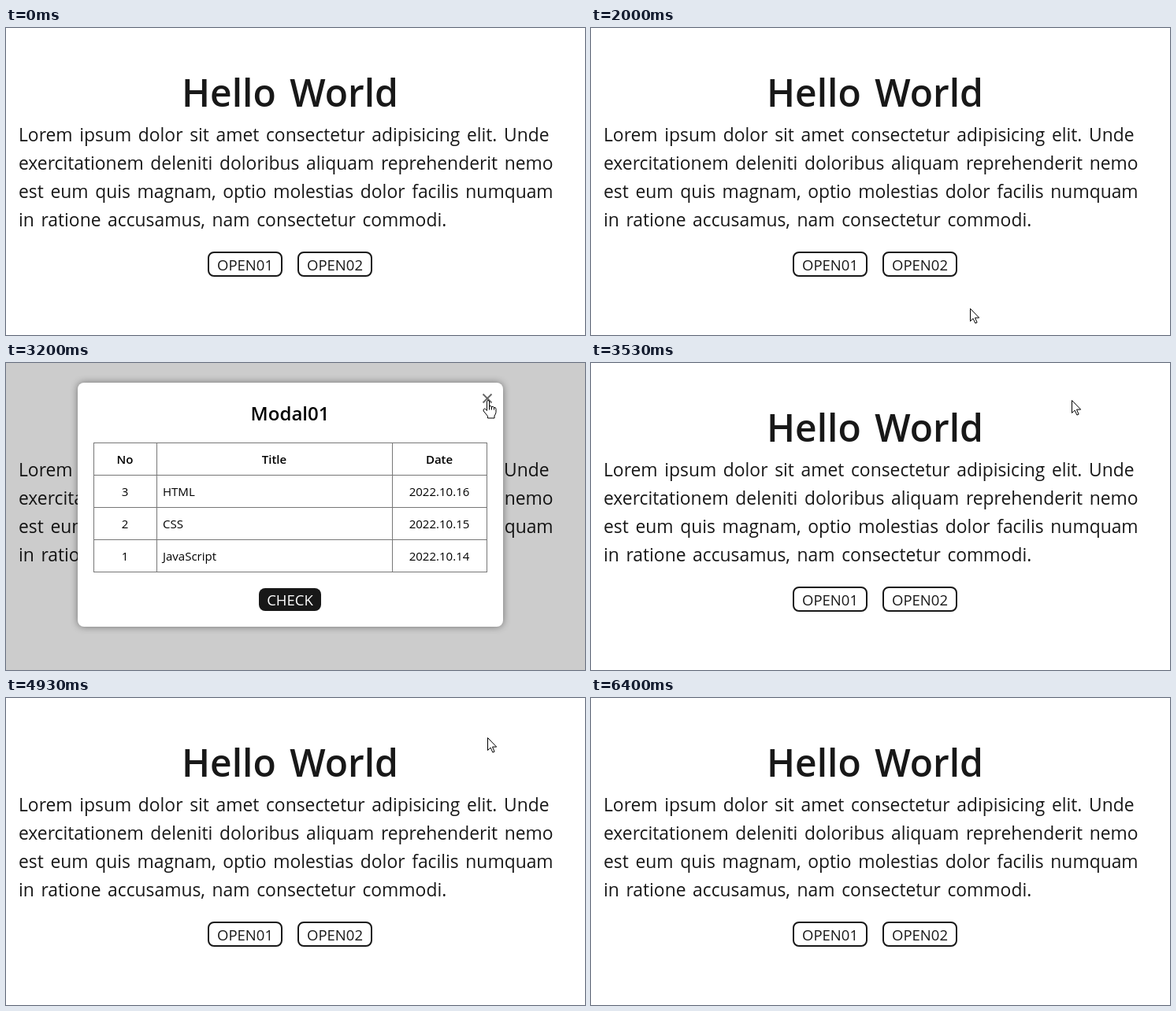
Recreate the animation shown at these times as an HTML page with a canvas. Size 735x390 px, loop 6790 ms.

```html
<!DOCTYPE html>
<html lang="en">
<head>
<meta charset="utf-8">
<title>Modal demo</title>
<style>
  html, body { margin: 0; width: 100%; height: 100%; overflow: hidden; background: #fff; }
  canvas { display: block; }
</style>
</head>
<body>
<canvas id="stage" width="735" height="390"></canvas>
<script>
const ctx = document.getElementById('stage').getContext('2d');
const LOOP = 6790;
const STEP = 200 / 3;          // the screen refreshes 15 times a second
const INK = '#181818';
const FAMILY = '"Open Sans", "Noto Sans", sans-serif';

const PARAGRAPH = [
  'Lorem ipsum dolor sit amet consectetur adipisicing elit. Unde',
  'exercitationem deleniti doloribus aliquam reprehenderit nemo',
  'est eum quis magnam, optio molestias dolor facilis numquam',
  'in ratione accusamus, nam consectetur commodi.'
];
const ROWS = [
  ['No', 'Title', 'Date'],
  ['3', 'HTML', '2022.10.16'],
  ['2', 'CSS', '2022.10.15'],
  ['1', 'JavaScript', '2022.10.14']
];

// All times below are in steps.
const MODALS = [
  [15, 30, 'Modal01'], [37, 53, 'Modal01'],
  [63, 74, 'Modal02'], [84, 94, 'Modal02']
];
const HANDS = [[12, 16], [35, 37], [48, 53], [61, 64], [71, 74], [82, 84]];

const easeInOut = p => p * p * (3 - 2 * p);
const easeOut = p => 1 - (1 - p) * (1 - p);
const linear = p => p;

// step, x, y, easing used to arrive there
const PATH = [
  [6, 356, 367],
  [12, 321, 308, easeOut],
  [15, 321, 308],
  [25, 531, 351, easeInOut],
  [27, 545, 367],
  [29, 545, 367],
  [30, 481, 356],
  [35, 315, 306, easeOut],
  [37, 315, 306],
  [47, 610, 47, easeInOut],
  [53, 610, 47],
  [61, 421, 289, easeInOut],
  [63, 421, 289],
  [70, 613, 45, easeInOut],
  [71, 611, 50],
  [74, 611, 50],
  [82, 414, 300, easeInOut],
  [84, 414, 300],
  [90, 671, 350, easeInOut],
  [93, 671, 350],
  [94, 684, 353],
  [96, 735, 360]
];

const during = (n, [from, to]) => n >= from && n < to;

function cursorAt(n) {
  const i = PATH.findIndex(key => key[0] > n);
  if (i < 1) return null;
  const [t0, x0, y0] = PATH[i - 1];
  const [t1, x1, y1, ease = linear] = PATH[i];
  const p = ease((n - t0) / (t1 - t0));
  return [Math.round(x0 + (x1 - x0) * p), Math.round(y0 + (y1 - y0) * p)];
}

function text(str, x, y, size, { weight = 400, color = INK, align = 'left', gap = 0 } = {}) {
  ctx.font = `${weight} ${size}px ${FAMILY}`;
  ctx.wordSpacing = `${gap}px`;
  ctx.fillStyle = color;
  ctx.textAlign = align;
  ctx.fillText(str, x, y);
}

function roundRect(x, y, w, h, r) {
  ctx.beginPath();
  ctx.roundRect(x, y, w, h, r);
}

function line(x0, y0, x1, y1) {
  ctx.beginPath();
  ctx.moveTo(x0, y0);
  ctx.lineTo(x1, y1);
  ctx.stroke();
}

function openButton(label, x) {
  ctx.strokeStyle = INK;
  ctx.lineWidth = 2;
  roundRect(x + 1, 285, 93, 30, 7);
  ctx.stroke();
  text(label, x + 47.5, 308, 18.5, { align: 'center' });
}

function drawPage() {
  ctx.fillStyle = '#fff';
  ctx.fillRect(0, 0, 735, 390);
  text('Hello World', 360.5, 100, 48, { weight: 600, align: 'center', gap: 5 });
  PARAGRAPH.forEach((row, i) => text(row, 16, 144 + i * 36, 22.85, { gap: 2.7 }));
  openButton('OPEN01', 256);
  openButton('OPEN02', 370);
}

function drawTable() {
  ctx.strokeStyle = '#777';
  ctx.lineWidth = 1;
  for (let i = 0; i < 5; i++) line(111, 101.5 + i * 41, 611, 101.5 + i * 41);
  for (const x of [111.5, 191.5, 490.5, 610.5]) line(x, 101, x, 266);

  ROWS.forEach(([no, title, date], i) => {
    const y = 128 + i * 41;
    const center = { weight: i ? 400 : 600, color: '#000', align: 'center' };
    text(no, 151, y, 15, center);
    text(date, 550, y, 15, center);
    if (i) text(title, 199, y, 15, { color: '#000' });
    else text(title, 340.5, y, 15, center);
  });
}

function drawModal(title) {
  ctx.fillStyle = 'rgba(0, 0, 0, .2)';
  ctx.fillRect(0, 0, 735, 390);

  ctx.save();
  ctx.shadowColor = 'rgba(0, 0, 0, .45)';
  ctx.shadowBlur = 10;
  ctx.fillStyle = '#fff';
  roundRect(91, 25, 540, 310, 8);
  ctx.fill();
  ctx.restore();

  ctx.strokeStyle = '#666';
  ctx.lineWidth = 1.8;
  line(605.5, 39.5, 616.5, 50.5);
  line(616.5, 39.5, 605.5, 50.5);

  text(title, 360.5, 73, 24, { weight: 600, color: '#000', align: 'center' });
  drawTable();

  ctx.fillStyle = INK;
  roundRect(321, 286, 79, 29, 8);
  ctx.fill();
  text('CHECK', 360.5, 308, 18.5, { weight: 500, color: '#fff', align: 'center' });
}

const ARROW = new Path2D('M0 0V16L3.6 12.6L6.4 18.6L8.6 17.6L6 11.6H11.2Z');
const HAND = new Path2D(
  'M0 13V1.5Q0 0 1.5 0T3 1.5V7.5Q4.5 6.3 6 8Q7.6 7 9 9Q11.5 8.6 11.5 11V15' +
  'Q11.3 17.5 9.5 19.5V22.5H1V20L-4.3 13.5Q-5 11 -3 10.5Q-1.6 10.8 0 13Z' +
  'M3 7.5V12M6 8V12M9 9V12');

function drawCursor([x, y], shape) {
  ctx.save();
  ctx.translate(x + .5, y + .5);
  ctx.lineWidth = 1;
  ctx.lineJoin = 'round';
  ctx.fillStyle = '#fff';
  ctx.strokeStyle = '#000';
  ctx.fill(shape);
  ctx.stroke(shape);
  ctx.restore();
}

function draw(ms) {
  // the small lead absorbs rounding at step edges
  const n = Math.floor((ms % LOOP + 4) / STEP);
  drawPage();
  const modal = MODALS.find(span => during(n, span));
  if (modal) drawModal(modal[2]);
  const pos = cursorAt(n);
  if (pos) drawCursor(pos, HANDS.some(span => during(n, span)) ? HAND : ARROW);
}

const start = performance.now();
function tick() {
  draw(performance.now() - start);
  requestAnimationFrame(tick);
}
tick();
</script>
</body>
</html>
```
